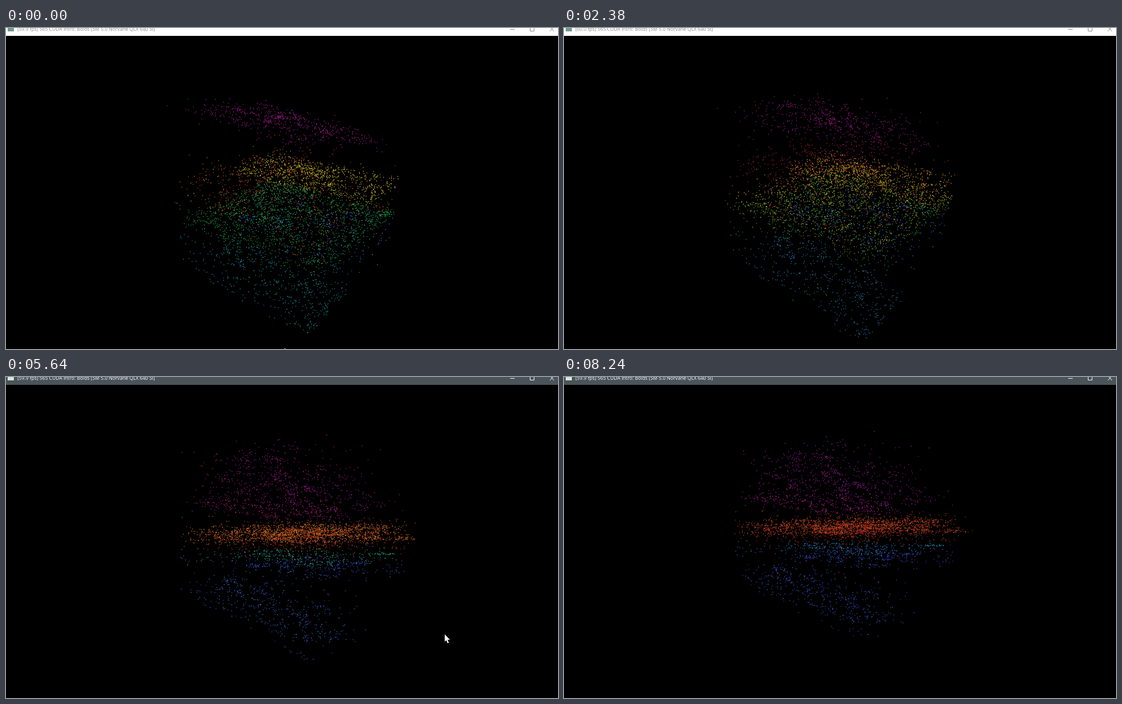
An HTML page with a canvas that plays this animation: 981x571 px, repeating every 8.34 s.

```html
<!DOCTYPE html>
<html lang="en">
<head>
<meta charset="utf-8">
<title>Boids</title>
<style>
  html, body { margin: 0; width: 100%; height: 100%; overflow: hidden; background: #000; }
  #stage { position: relative; width: 981px; height: 571px; overflow: hidden; background: #000; }
  canvas, #cursor { position: absolute; left: 0; top: 0; }
  #bar { position: absolute; left: 0; top: 0; width: 981px; height: 14px; overflow: hidden;
    background: #fff; color: #8a8a8a; font: 8.65px/12px "Open Sans", "Noto Sans", sans-serif; }
  #bar.active { background: #4a5459; color: #fff; }
  #title { position: absolute; left: 20px; top: -4px; white-space: pre; }
  #icon { position: absolute; left: 3px; top: -5px; width: 11px; height: 11px; background: #6f9891; }
  .active #icon { background: #d5e5df; }
  #bar svg { position: absolute; left: 0; top: 0; fill: none; stroke: currentColor; }
</style>
</head>
<body>
<div id="stage">
  <canvas id="view" width="981" height="571"></canvas>
  <div id="bar">
    <div id="icon"></div>
    <div id="title">[<span id="fps">59.9</span> fps] 565 CUDA Intro: Boids [SM 5.0 Norvane QLX 640 Si]</div>
    <svg width="981" height="14"><path d="M896 2.5h8M931.5-2.5h7v8h-7zM966.5-2l7.5 8M974-2l-7.5 8"/></svg>
  </div>
  <svg id="cursor" width="12" height="18"><path d="M0 0v13.5l3-2.8 2.3 5.3 2.2-1-2.3-5h4.3z" fill="#fff"/></svg>
</div>
<script>
const LOOP = 8340, COUNT = 4600;
const $ = id => document.getElementById(id);
const ctx = $('view').getContext('2d');
const mix = (a, b, f) => a + (b - a) * f;
const clamp = (x, a, b) => Math.min(b, Math.max(a, x));
const smooth = (t, a, b) => {
  const f = clamp((t - a) / (b - a), 0, 1);
  return f * f * (3 - 2 * f);
};
// Reflect a coordinate at the walls of the unit box.
const fold = x => (x > 1 ? 2 - x : x < -1 ? -2 - x : x);

let seed = 565;
function rnd() {
  seed = (seed + 0x6D2B79F5) | 0;
  let x = Math.imul(seed ^ (seed >>> 15), 1 | seed);
  x = (x + Math.imul(x ^ (x >>> 7), 61 | x)) ^ x;
  return ((x ^ (x >>> 14)) >>> 0) / 4294967296;
}
const flat = () => rnd() * 2 - 1;
const bell = () => flat() + flat();

// Sheets of boids in a box: share of the boids, then height, thickness and hue
// before and after they regroup, the part of the floor they favour, and tilt.
const sheets = [
  { share: .13, h: [.73, .66], thick: [.07, .26], hue: [310, 315], at: [.15, -.25], tilt: [.15, .15] },
  { share: .09, h: [.10, .36], thick: [.16, .13], hue: [375, 326], at: [0, -.4], tilt: [.05, 0] },
  { share: .18, h: [.02, .06], thick: [.06, .08], hue: [415, 385], at: [.5, 0], tilt: [0, 0] },
  { share: .28, h: [-.34, 0], thick: [.08, .08], hue: [500, 387], at: [.05, 0], tilt: [0, 0] },
  { share: .08, h: [-.16, -.08], thick: [.16, .12], hue: [374, 372], at: [0, 0], tilt: [0, 0] },
  { share: .07, h: [-.50, -.26], thick: [.20, .06], hue: [525, 510], at: [0, 0], tilt: [0, 0] },
  { share: .07, h: [-.58, -.38], thick: [.20, .09], hue: [575, 588], at: [.3, 0], tilt: [0, 0] },
  { share: .10, h: [-.90, -.76], thick: [.10, .11], hue: [545, 578], at: [-.6, .15], tilt: [0, .2] }
];

for (const s of sheets) {
  const n = Math.round(COUNT * s.share);
  const hubs = Array.from({ length: Math.ceil(n / 25) }, () => [flat(), flat(), flat()]);
  const place = (axis, v) => s.at[axis] + (1 - Math.abs(s.at[axis])) * v;
  s.boids = Array.from({ length: n }, () => {
    const hub = hubs[Math.floor(rnd() * hubs.length)];
    const near = rnd() < 0.4, stray = rnd() < 0.12;
    const [x, z, y] = hub.map(c => (near ? c + bell() * 0.09 : flat()));
    return {
      x: stray ? flat() : place(0, x),
      z: stray ? flat() : place(1, z),
      y: (near ? y : bell() * 0.8) * (stray ? 2 : 1),
      lag: bell() * 450,
      phase: rnd() * 6.28,
      tint: bell() * 10,
      glow: 0.85 + rnd() * 0.35
    };
  });
}

function color(hue, glow) {
  const h = (hue + 360) % 360;
  const warm = h < 120 ? Math.max(0, Math.cos((h - 48) * Math.PI / 90)) : 0;
  const cool = h > 205 && h < 250 ? 12 : 0;
  return `hsl(${h.toFixed(0)} ${72 - cool}% ${((35 + 13 * warm + cool) * glow).toFixed(0)}%)`;
}

// Perspective view of the box; dragging levels the view and pans it.
function camera(t) {
  const drag = smooth(t, 3340, 4580);
  const yaw = mix(53, 48, drag) * Math.PI / 180;
  const pitch = mix(20, 0, drag) * Math.PI / 180;
  const cy = Math.cos(yaw), sy = Math.sin(yaw), cp = Math.cos(pitch), sp = Math.sin(pitch);
  const midX = mix(487, 522, drag);
  return (x, y, z) => {
    const depth = z * cy - x * sy;
    const scale = 155 / (1 - (depth * cp + y * sp) / 4.5);
    return [midX + (x * cy + z * sy) * scale, 286 - (y * cp - depth * sp) * scale];
  };
}

function drawBoids(t) {
  ctx.fillStyle = '#000';
  ctx.fillRect(0, 0, 981, 571);
  const project = camera(t);
  const late = clamp((t - 4200) / 4100, 0, 1);
  const drift = (4200 - t) / 40000;
  for (const s of sheets) {
    for (const b of s.boids) {
      const p = smooth(t + b.lag, 700, 3700);
      const now = key => mix(s[key][0], s[key][1], p);
      const sway = Math.sin(b.phase + t / 1900) * 0.02;
      const x = fold(b.x + drift + sway), z = fold(b.z + drift - sway);
      let y = now('h') + b.y * now('thick') - s.tilt[0] * x - s.tilt[1] * z;
      y = fold(y + 0.12 * late * (1 - y));
      let hue = now('hue');
      hue = hue > 480 ? mix(hue, 600, late * 0.6) : hue - 14 * late;
      ctx.fillStyle = color(hue + b.tint, b.glow);
      ctx.fillRect(...project(x, y, z), 1.35, 1.35);
    }
  }
}

// Eight pictures between two marks, about 7.4 a second.
const marks = [120, 1210, 2260, 3340, 4430, 5520, 6600, 7690, 8780];
function snap(t) {
  if (t < marks[0]) return 0;
  const i = marks.findIndex(m => m > t) - 1;
  const step = (marks[i + 1] - marks[i]) / 8;
  return marks[i] + Math.floor((t - marks[i]) / step) * step;
}

const fpsSteps = [[0, '59.9'], [600, '60.0'], [2700, '58.9'], [3750, '60.0'],
  [4850, '59.9'], [5900, '60.0'], [8000, '59.9']];
const mouse = [[0, 495, 569], [120, 495, 600], [2650, 540, 580], [3060, 533, 339], [3340, 533, 339],
  [4400, 385, 329], [4600, 385, 329], [5400, 770, 450], [5640, 789, 465], [6100, 818, 484]];

function drawMouse(t) {
  const i = mouse.findIndex(m => m[0] > t);
  const el = $('cursor');
  el.style.display = i < 0 ? 'none' : 'block';
  if (i < 0) return;
  const [t0, x0, y0] = mouse[i - 1], [t1, x1, y1] = mouse[i];
  const f = (t - t0) / (t1 - t0);
  el.style.transform = `translate(${mix(x0, x1, f)}px, ${mix(y0, y1, f)}px)`;
}

let shown = -1;
const start = performance.now();
function tick() {
  const t = snap((performance.now() - start) % LOOP);
  if (t !== shown) {
    shown = t;
    drawBoids(t);
    drawMouse(t);
    $('bar').className = t >= 2900 ? 'active' : '';
    $('fps').textContent = fpsSteps.filter(s => s[0] <= t).pop()[1];
  }
  requestAnimationFrame(tick);
}
tick();
</script>
</body>
</html>
```
